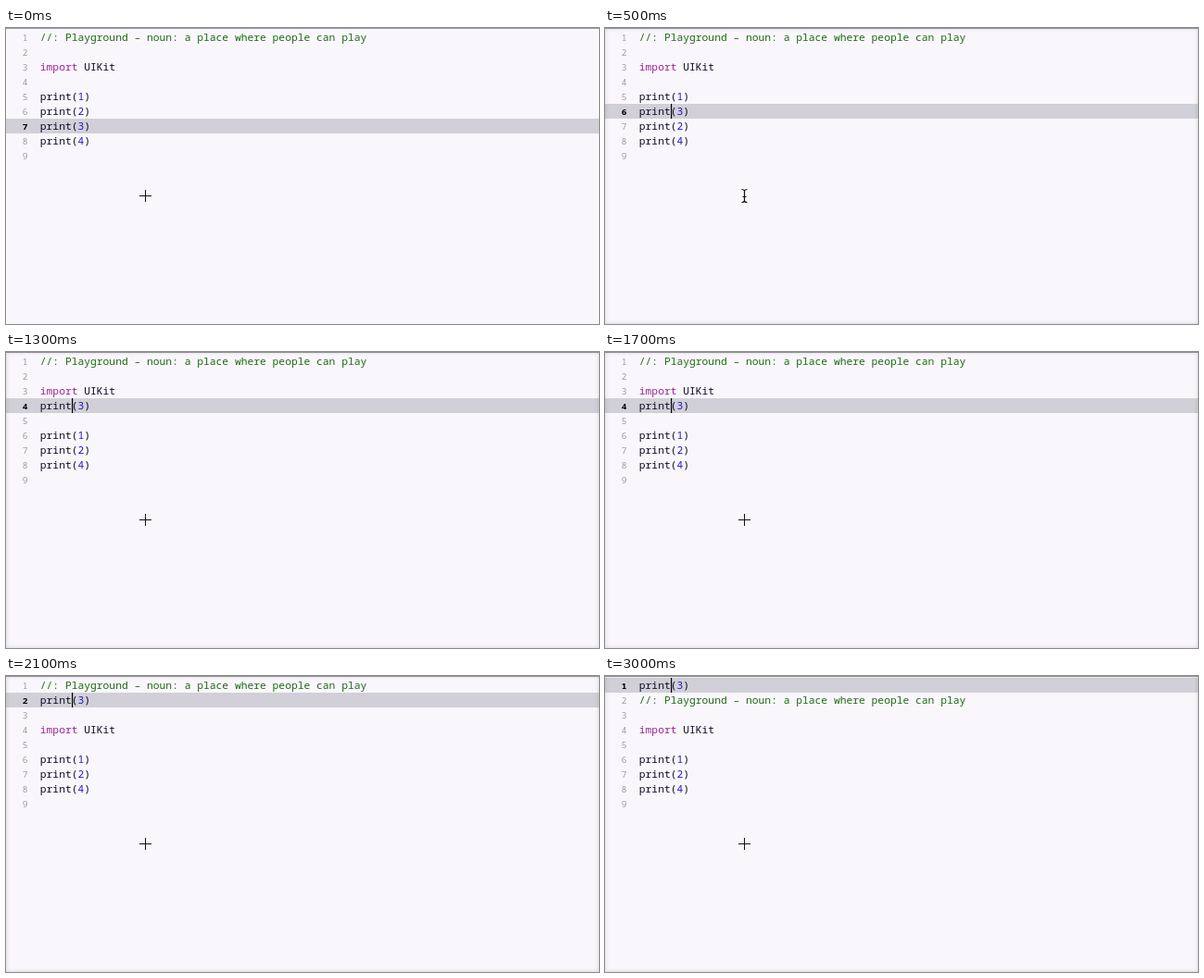
Write an HTML page that moves like this. It is 640 px wide and 320 px high and loops after 3100 ms.

```html
<!DOCTYPE html>
<html lang="en">
<head>
<meta charset="utf-8">
<title>Moving a line of code</title>
<style>
html, body { margin: 0; width: 100%; height: 100%; overflow: hidden; background: #faf7fc; }
svg { position: absolute; left: 0; top: 0; display: block; }
text { font-family: "Noto Sans Mono", "Liberation Mono", monospace; font-size: 11.3px; white-space: pre; fill: #0c0a24; }
.num { font-size: 9.6px; fill: #9c9ba3; text-anchor: end; }
.num.on { fill: #000; font-weight: 600; }
.comment { fill: #1c6a12; }
.key { fill: #9b2393; }
.val { fill: #2418c8; }
#edge { position: absolute; left: 0; top: 0; width: 640px; height: 320px; box-shadow: inset 0 0 5px rgba(60, 70, 60, .2); }
</style>
</head>
<body>
<svg id="stage" width="640" height="320" viewBox="0 0 640 320"></svg>
<div id="edge"></div>
<script>
const LOOP = 3100, ROW = 16, TOP = 2, BASE = 14;
const stage = document.getElementById('stage');
const edge = document.getElementById('edge');

function add(tag, attrs, parent = stage) {
  const el = document.createElementNS('http://www.w3.org/2000/svg', tag);
  for (const k in attrs) el.setAttribute(k, attrs[k]);
  parent.appendChild(el);
  return el;
}

function addLine(parts) {
  const line = add('text', { x: 36.8 });
  for (const [str, cls] of parts) {
    add('tspan', cls ? { class: cls } : {}, line).textContent = str;
  }
  return line;
}

const call = n => [['print('], [n, 'val'], [')']];

const band = add('rect', { x: 0, width: 640, height: ROW, fill: '#d1d0d8' });
add('rect', { width: 640, height: 1, fill: '#9b9a9e' });

const nums = [];
for (let i = 0; i < 9; i++) {
  const num = add('text', { x: 23.4, y: BASE + i * ROW - 0.4 });
  num.textContent = i + 1;
  nums.push(num);
}

// The other rows keep their order; the moving row is inserted among them.
const others = [
  [['//: Playground – noun: a place where people can play', 'comment']],
  [],
  [['import', 'key'], [' UIKit']],
  [],
  call('1'), call('2'), call('4'), []
].map(addLine);
const moving = addLine(call('3'));

const caret = add('rect', { x: 71, width: 1.2, height: ROW, fill: '#000' });
const pen = { fill: 'none', stroke: '#111', 'stroke-width': 1 };
const cross = add('path', { ...pen, d: 'M144 181.5H157M150.5 175V188' });
const beam = add('path', {
  ...pen, 'stroke-width': 1.2,
  d: 'M147.5 174.5Q150.5 174.5 150.5 176.5Q150.5 174.5 153.5 174.5M150.5 176V187M147.5 188.5Q150.5 188.5 150.5 186.5Q150.5 188.5 153.5 188.5M148.5 182.5H152.5'
});

const moves = [400, 800, 1300, 1900, 2100, 2300];
const beams = [500, 2300];
const show = (el, on) => { el.style.display = on ? '' : 'none'; };

function draw(t) {
  const at = 6 - moves.filter(m => t >= m).length;
  const order = [...others.slice(0, at), moving, ...others.slice(at)];
  order.forEach((line, i) => line.setAttribute('y', BASE + i * ROW));
  nums.forEach((n, i) => n.setAttribute('class', i === at ? 'num on' : 'num'));
  band.setAttribute('y', TOP + at * ROW);
  caret.setAttribute('y', TOP + at * ROW);
  show(caret, t >= 100);
  show(edge, t >= 100);
  const isBeam = beams.some(b => t >= b && t < b + 100);
  show(beam, isBeam);
  show(cross, !isBeam);
}

const start = performance.now();
function tick() {
  draw((performance.now() - start) % LOOP);
  requestAnimationFrame(tick);
}
tick();
</script>
</body>
</html>
```
